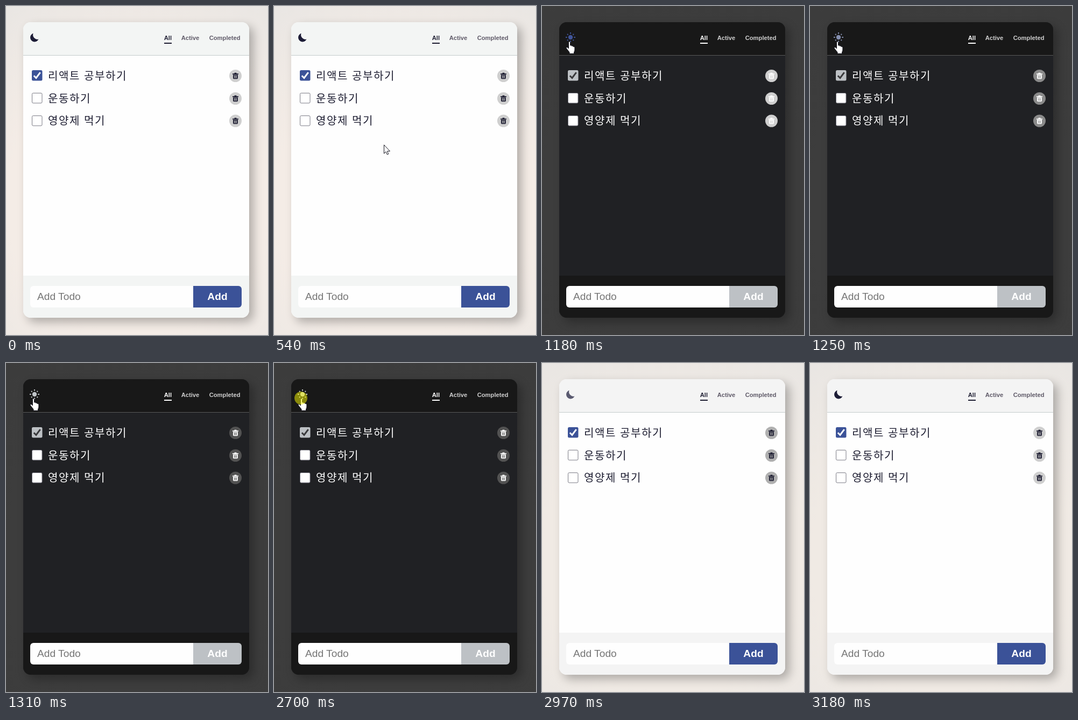
Recreate the animation shown at these times as an HTML page. Size 487x610 px, loop 3.71 s.

```html
<!DOCTYPE html>
<html lang="ko">
<head>
<meta charset="utf-8">
<title>Todo</title>
<style>
html, body { margin: 0; width: 100%; height: 100%; overflow: hidden; }
:root {
  animation: theme 3710ms step-end infinite, tint 3710ms step-end infinite,
    icon 3710ms step-end infinite, disc 3710ms step-end infinite;
}
body { background: radial-gradient(circle at 50% 60%, var(--mid) 55%, var(--edge)); }
.card {
  position: absolute; left: 32px; top: 30px; width: 420px; height: 548px;
  border-radius: 14px; background: var(--panel);
  box-shadow: 8px 8px 18px rgba(0, 0, 0, .28);
}
svg { position: absolute; left: 0; top: 0; width: 487px; height: 610px; }

.bar { fill: var(--bar); }
.rule { fill: var(--rule); }
.ink { fill: var(--ink); }
.soft { fill: var(--soft); }
.nav { font: bold 11.2px "Liberation Sans", Arial, sans-serif; }
.todo { font: 300 20.1px "Noto Sans CJK KR", "Noto Sans CJK", sans-serif; letter-spacing: 1.5px; }
.field { font: 19.2px "Liberation Sans", Arial, sans-serif; fill: #757575; }
.add { font: bold 19.2px "Liberation Sans", Arial, sans-serif; fill: #fff; text-anchor: middle; }
.accent { fill: var(--accent); }
.box { fill: #fff; stroke: #7b7b85; }
.tick { fill: none; stroke: var(--tick); stroke-width: 3; }
.disc { fill: var(--disc); }
.slats { stroke: var(--disc); stroke-width: 1; }
.moon { fill: var(--icon); opacity: var(--day); }
.sun { fill: var(--icon); stroke: var(--icon); opacity: var(--night); }
.pointer { fill: #fff; stroke: #15151f; stroke-width: 1; stroke-linejoin: round; }
.arrow { animation: arrow 3710ms step-end infinite; }
.hand { animation: hand 3710ms step-end infinite; }
.flash { fill: #ff0; animation: flash 3710ms step-end infinite; }

@keyframes theme {
  0%, 76.27%, 100% {
    --panel: #fefefe; --rule: #c5cccc; --ink: #1e1e32; --soft: #5f5a68;
    --accent: #3b5298; --tick: #fff; --day: 1; --night: 0;
  }
  31.8% {
    --panel: #202124; --rule: #585858; --ink: #fff; --soft: #cfcfcf;
    --accent: #bdc1c5; --tick: #3a3a3c; --day: 0; --night: 1;
  }
}
@keyframes tint {
  0%, 100% { --bar: #f3f5f4; --mid: #f4ece6; --edge: #e9e6e3; }
  31.8% { --bar: #181818; --mid: #3d3d3d; --edge: #3c3c3c; }
  76.27% { --bar: #f4f4f4; --mid: #f0eae4; --edge: #e9e6e3; }
}
@keyframes icon {
  0%, 83.82%, 100% { --icon: #1c1c36; }
  24.25% { --icon: #2b3766; }
  26.14% { --icon: #354786; }
  28.03% { --icon: #3b5298; }
  31.8% { --icon: #41559a; }
  33.69% { --icon: #858fb0; }
  35.3% { --icon: #c1c5c9; }
  76.27% { --icon: #b6b6b8; }
  78.16% { --icon: #8a8a98; }
  80.05% { --icon: #5a5a70; }
  81.94% { --icon: #35354c; }
}
@keyframes disc {
  0%, 83.82%, 100% { --disc: #cfcfcf; }
  33.69% { --disc: #8a8a8a; }
  35.3% { --disc: #525252; }
  76.27% { --disc: #636363; }
  78.16% { --disc: #8e8e8e; }
  80.05% { --disc: #b0b0b0; }
  81.94% { --disc: #c5c5c5; }
}
@keyframes arrow {
  0%, 22.37%, 80.05%, 100% { opacity: 0; transform: none; }
  7% { opacity: 1; transform: translate(407px, 562px); }
  8.89% { opacity: 1; transform: translate(384px, 528px); }
  10.78% { opacity: 1; transform: translate(335px, 454px); }
  12.66% { opacity: 1; transform: translate(269px, 355px); }
  14.55% { opacity: 1; transform: translate(204px, 257px); }
  16.44% { opacity: 1; transform: translate(148px, 173px); }
  18.32% { opacity: 1; transform: translate(105px, 109px); }
  20.48% { opacity: 1; transform: translate(79px, 70px); }
  78.16% { opacity: 1; transform: translate(22px, 72px); }
}
@keyframes hand {
  0%, 78.16%, 100% { opacity: 0; }
  22.37% { opacity: 1; }
}
@keyframes flash {
  0%, 31.8%, 76.27%, 100% { opacity: 0; }
  28.03%, 72.77% { opacity: .5; }
}
</style>
</head>
<body>
<div class="card"></div>
<svg viewBox="0 0 487 610">
  <defs>
    <g id="bin">
      <circle class="disc" cx="426.5" cy="129.5" r="11.5"/>
      <path class="ink" d="M421 125.2h3.4v-.6q0-.8.8-.8h2.6q.8 0 .8.8v.6h3.4v1.7h-11zM422 127.6h9v6q0 1.6-1.6 1.6h-5.8q-1.6 0-1.6-1.6z"/>
      <path class="slats" d="M424.5 128.8v5M426.5 128.8v5M428.5 128.8v5"/>
    </g>
    <rect id="box" class="box" x="48.5" y="161.5" width="18.5" height="18.5" rx="2"/>
  </defs>

  <path class="bar" d="M32 91V44a14 14 0 0 1 14-14H438a14 14 0 0 1 14 14V91z"/>
  <path class="bar" d="M32 500H452V564a14 14 0 0 1-14 14H46a14 14 0 0 1-14-14z"/>
  <rect class="rule" x="32" y="91" width="420" height="1"/>

  <path class="moon" d="M50.6 50.8A8 8 0 1 0 60.4 61.6A8.3 8.3 0 0 1 50.6 50.8z"/>
  <g class="sun">
    <circle cx="53" cy="58" r="4.2" stroke="none"/>
    <path stroke-width="1.9" d="M53 49v2.6M53 64.4v2.6M44 58h2.6M59.4 58h2.6M47 52l1.5 1.5M57.5 62.5l1.5 1.5M47 64l1.5-1.5M57.5 53.5l1.5-1.5"/>
  </g>

  <g class="nav">
    <text class="ink" x="293.7" y="63">All</text>
    <text class="soft" x="325.7" y="63">Active</text>
    <text class="soft" x="377.7" y="63">Completed</text>
  </g>
  <rect class="ink" x="294" y="68" width="14" height="2"/>

  <rect class="accent" x="48" y="119" width="19.5" height="19.5" rx="2.5"/>
  <path class="tick" d="M51.8 129.2l4.2 4.3 7.7-10.3"/>
  <use href="#box"/>
  <use href="#box" y="42"/>
  <g class="todo ink">
    <text x="78" y="137">리액트 공부하기</text>
    <text x="78" y="179">운동하기</text>
    <text x="78" y="220">영양제 먹기</text>
  </g>
  <use href="#bin"/>
  <use href="#bin" y="42"/>
  <use href="#bin" y="83.5"/>

  <path fill="#fefefe" d="M348 519H51a6 6 0 0 0-6 6V553a6 6 0 0 0 6 6H348z"/>
  <path class="accent" d="M348 519H432a6 6 0 0 1 6 6V553a6 6 0 0 1-6 6H348z"/>
  <text class="field" x="58" y="545">Add Todo</text>
  <text class="add" x="393" y="545">Add</text>

  <path class="pointer arrow" d="M.5.5V16.5L4 13.2 6.4 18.5 8.8 17.5 6.5 12.2H11.5z"/>
  <g class="hand">
    <path class="pointer" transform="translate(44.5 65.3)" d="M5 2Q5 .5 6.5 .5T8 2V8Q8.3 7.3 9.4 7.4 10.7 7.6 10.8 9 11.4 8.3 12.4 8.6 13.5 9 13.5 10.2 14.2 9.7 15.2 10.1 16.4 10.6 16.4 12V16Q16.4 18 15 20.5V23H6.5V20.5Q4.5 18 1 13.5 0 12 1.2 11.2 2.5 10.6 5 13.5z"/>
  </g>
  <circle class="flash" cx="50" cy="65" r="12"/>
</svg>
</body>
</html>
```
